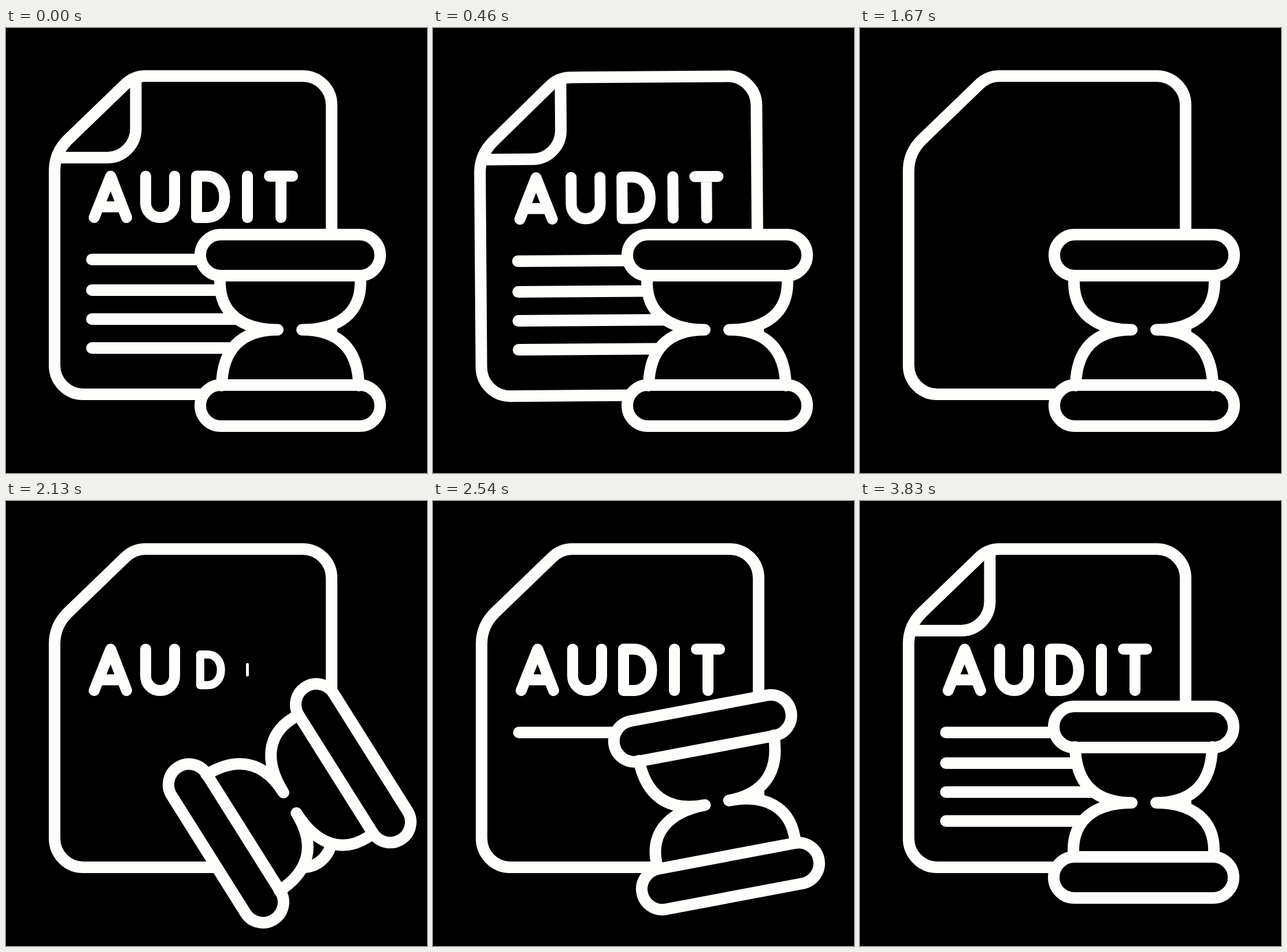
Recreate the animation shown at these times as an HTML page. Size 728 by 769 pixels, loop 4 s.

```html
<!DOCTYPE html>
<html lang="en">
<head>
<meta charset="utf-8">
<title>Audit</title>
<style>
  html, body { margin: 0; width: 100%; height: 100%; overflow: hidden; background: #000; }
  svg { display: block; width: 100vw; height: 100vh; fill: none; stroke: #fdfdfc; stroke-width: 20; }
  .round, #glass { stroke-linecap: round; stroke-linejoin: round; }
  #letters { stroke-width: 19; }
  #letters path { transform-box: fill-box; transform-origin: center; }
  .solid { fill: #000; }
  .mask { fill: #000; stroke: none; }
</style>
</head>
<body>
<svg viewBox="0 0 728 769" role="img" aria-label="AUDIT">
  <g id="page">
    <path id="outline" pathLength="1" d="M513 83A50 50 0 0 1 563 133V583A50 50 0 0 1 513 633H133.500A49.500 50 0 0 1 84 583V247C84 226 92.500 207 107.500 192.500L205.500 98C215 88.500 228 83 241 83H513"/>
    <path id="fold" pathLength="1" d="M224.500 82V174A49.500 50 0 0 1 175 224H86"/>
    <g id="letters" class="round">
      <path d="M152.500 327.500L181 256L208.500 327.500M161 309H201"/>
      <path d="M241.500 256V302.500A25 25 0 0 0 291.500 302.500V256"/>
      <path d="M329.500 256H347C366 256 378 272 378 292S366 327.500 347 327.500H329.500Z"/>
      <path d="M417.500 256V327.500"/>
      <path d="M455.500 256H495.500M475.500 256V327.500"/>
    </g>
    <g id="lines" class="round"></g>
  </g>
  <g id="glass">
    <path class="mask" d="M370 428V440C370 490 405 521.500 470 521.500C404 521.500 374 558 373 618H610C609 558 579 521.500 512 521.500C578 521.500 613 490 613 440V428Z"/>
    <rect class="solid" x="336" y="357" width="311" height="71" rx="35.500"/>
    <rect class="solid" x="336" y="617" width="311" height="71" rx="35.500"/>
    <path d="M370 428V440C370 490 405 521.500 470 521.500C404 521.500 374 558 373 618"/>
    <path d="M613 428V440C613 490 578 521.500 512 521.500C579 521.500 609 558 610 618"/>
  </g>
</svg>
<script>
const LOOP = 4000, FPS = 24;
const REDRAW = 1125;                       // the page is cleared and drawn anew
const byId = id => document.getElementById(id);
const page = byId('page'), glass = byId('glass');
const outline = byId('outline'), fold = byId('fold');
const letters = [...byId('letters').children];

const lines = [400, 453, 503, 553].map(y => {
  const line = document.createElementNS('http://www.w3.org/2000/svg', 'path');
  line.setAttribute('d', `M148.500 ${y}H516`);
  line.setAttribute('pathLength', 1);
  byId('lines').append(line);
  return line;
});

// Eased progress from 0 to 1
function ease(t, start, duration) {
  const u = Math.min(1, Math.max(0, (t - start) / duration));
  return u * u * (3 - 2 * u);
}

// Everything is complete until the page is cleared
const reveal = (t, start, duration) => t < REDRAW ? 1 : ease(t, start, duration);

function trim(path, amount) {
  path.style.visibility = amount > 0 ? 'visible' : 'hidden';
  path.style.strokeDasharray = amount < 1 ? `${amount} 2` : 'none';
}

// Swing up, fall back, then a damped wobble
function pageAngle(t) {
  const peak = 14.65, top = 185, rest = 306;
  if (t < top) return peak * ease(t, 0, top);
  if (t < rest) return peak * Math.cos(Math.PI / 2 * (t - top) / (rest - top));
  if (t >= REDRAW) return 0;
  const s = t - rest;
  return -6.8 * Math.exp(-0.0058 * s) * Math.sin(Math.PI * s / 160);
}

function draw(t) {
  page.setAttribute('transform', `rotate(${pageAngle(t)} 562 633)`);
  glass.setAttribute('transform', `rotate(${180 * ease(t, 1792, 880)} 491 521.500)`);
  trim(outline, reveal(t, REDRAW, 541.67));
  letters.forEach((letter, i) => {
    const size = reveal(t, 1791.67 + i * 83.33, 250);
    letter.style.visibility = size > 0 ? 'visible' : 'hidden';
    letter.style.transform = `scale(${size})`;
  });
  lines.forEach((line, i) => trim(line, reveal(t, 2375 + i * 250, 250)));
  trim(fold, reveal(t, 3416.67, 416.66));
}

const origin = performance.now();
function tick() {
  const ms = (performance.now() - origin) % LOOP;
  const step = Math.floor(ms * FPS / 1000 + 0.09) % (LOOP * FPS / 1000);
  draw(step * 1000 / FPS);
  requestAnimationFrame(tick);
}
tick();
</script>
</body>
</html>
```
